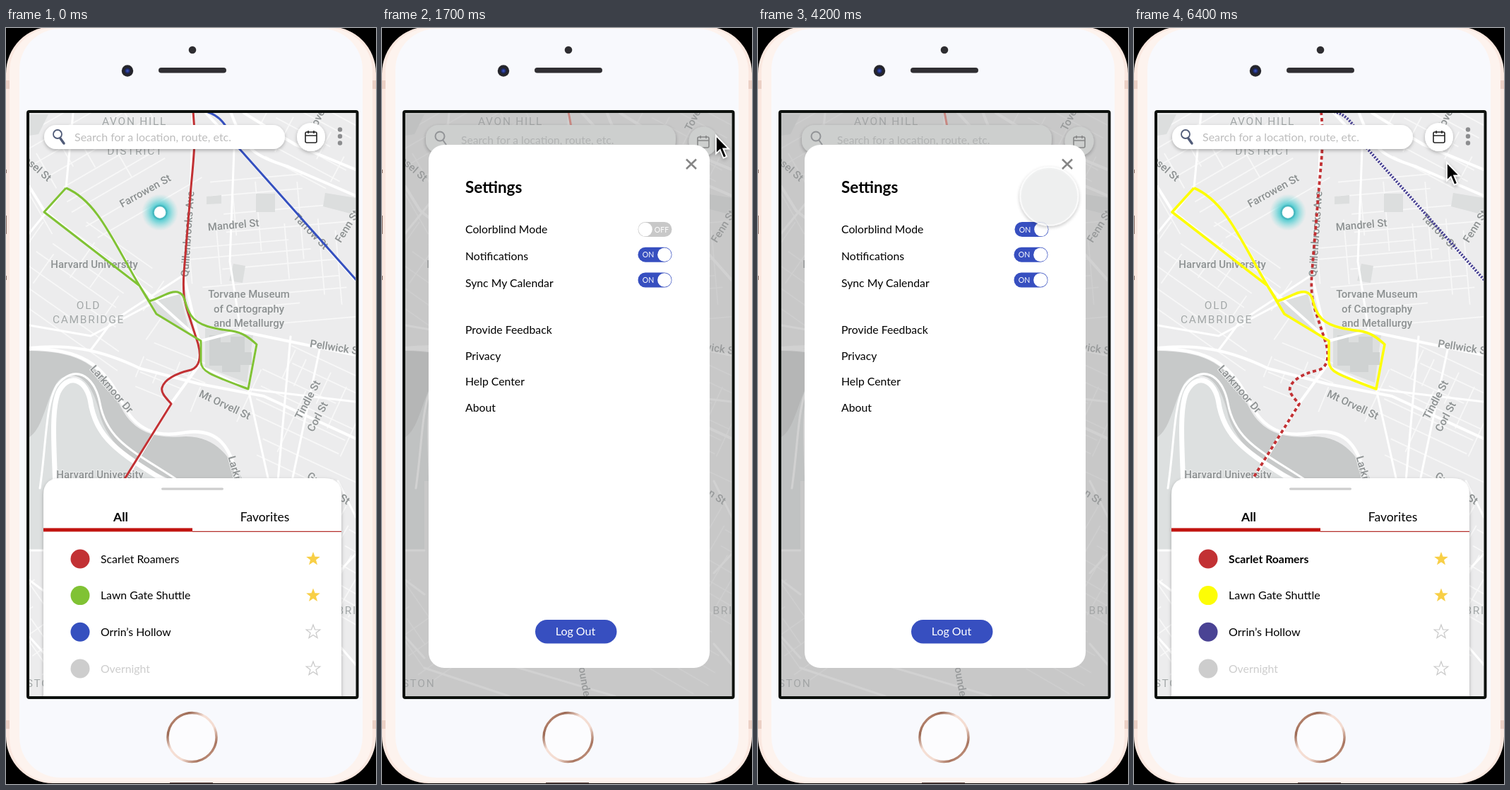
An HTML page that plays this animation: 524 by 1068 pixels, repeating every 6.5 s.

```html
<!DOCTYPE html>
<html lang="en">
<head>
<meta charset="utf-8">
<title>Shuttle map settings</title>
<style>
html, body { margin: 0; width: 100%; height: 100%; overflow: hidden; background: #000; }
svg { display: block; width: 524px; height: 1068px; }
text { font: 15.8px Lato, sans-serif; }
.mid { text-anchor: middle; }
.bold { font-weight: 700; }
#roads path { fill: none; stroke: #fff; stroke-linecap: round; stroke-linejoin: round; }
#labels text { font: 500 15px Roboto, sans-serif; fill: #8d9192; paint-order: stroke; stroke: #eeefef; stroke-width: 2px; }
#labels .area { font-weight: 400; font-size: 15.5px; letter-spacing: 1.7px; fill: #a3a7a8; }
.route { fill: none; stroke-linejoin: round; stroke-width: 3; }
.home, .before, .after, .set, .off, .on, #arrow, #touch { animation: 6.5s step-end infinite; }
.home { animation-name: home; }
.before { animation-name: before; }
.after { animation-name: after; }
.set { animation-name: set; }
.off { animation-name: off; }
.on { animation-name: on; }
#arrow { animation-name: arrow; }
#touch { animation-name: touch; }
@keyframes home { 0%, 80% { opacity: 1 } 26.154% { opacity: 0 } }
@keyframes before { 0% { opacity: 1 } 26.154%, 100% { opacity: 0 } }
@keyframes after { 0% { opacity: 0 } 80%, 100% { opacity: 1 } }
@keyframes set { 0%, 80% { opacity: 0 } 26.154% { opacity: 1 } }
@keyframes off { 0% { opacity: 1 } 55.385%, 100% { opacity: 0 } }
@keyframes on { 0% { opacity: 0 } 55.385%, 100% { opacity: 1 } }
@keyframes arrow {
  0% { transform: translate(534px, 300px); opacity: 1 }
  12.308% { transform: translate(534px, 300px); animation-timing-function: ease-out }
  20% { transform: translate(473px, 152px); opacity: 1 }
  33.846% { transform: translate(473px, 152px); opacity: 0 }
  80%, 100% { transform: translate(443px, 190px); opacity: 1 }
}
@keyframes touch {
  0% { transform: translate(473px, 152px); opacity: 0 }
  33.846% { transform: translate(473px, 152px); opacity: 1; animation-timing-function: ease-in-out }
  43.077% { transform: translate(383px, 285px); opacity: 1 }
  60% { transform: translate(383px, 285px); opacity: 1; animation-timing-function: ease-in-out }
  69.231% { transform: translate(441.5px, 191px); opacity: 1 }
  80%, 100% { transform: translate(441.5px, 191px); opacity: 0 }
}
</style>
</head>
<body>
<svg viewBox="0 0 524 1068">
<defs>
  <clipPath id="screen"><rect x="33" y="120" width="462" height="824"/></clipPath>
  <filter id="shade" x="-30%" y="-30%" width="160%" height="170%">
    <feDropShadow dx="0" dy="2" stdDeviation="2.5" flood-opacity=".28"/>
  </filter>
  <radialGradient id="glow">
    <stop offset=".3" stop-color="#35c3ca"/>
    <stop offset=".55" stop-color="#5fd0d4" stop-opacity=".75"/>
    <stop offset="1" stop-color="#8fdfe0" stop-opacity="0"/>
  </radialGradient>
  <radialGradient id="lens">
    <stop offset=".1" stop-color="#3a50b8"/>
    <stop offset=".5" stop-color="#1c2762"/>
    <stop offset=".75" stop-color="#24242a"/>
  </radialGradient>
  <linearGradient id="rose" x1="0" y1="0" x2="1" y2="1">
    <stop offset="0" stop-color="#d9a68f"/>
    <stop offset=".22" stop-color="#9c6a55"/>
    <stop offset=".4" stop-color="#f6e0d6"/>
    <stop offset=".62" stop-color="#f3dbd0"/>
    <stop offset=".8" stop-color="#a87560"/>
    <stop offset="1" stop-color="#e3b9a6"/>
  </linearGradient>
  <path id="red" d="M265 118C269 160 266 180 262 225L252 345C250 375 253 388 258 403L272 446C277 465 274 479 262 483C240 488 224 497 221 508C219 515 226 522 234 531L168 637"/>
  <path id="loop" d="M85 226L54 260L189 364L213 404L276 442V472C277 486 290 490 343 510L355 447C345 438 335 430 320 428C295 425 272 421 262 406C251 390 256 376 243 373C232 371 220 381 203 386L189 364C152 302 130 245 85 226"/>
  <path id="blue" d="M283 118C302 123 310 133 330 170L496 356"/>
  <g id="calendar" fill="none" stroke-width="1.6">
    <rect x="-8" y="-7" width="16" height="15" rx="2"/>
    <path d="M-8-2H8M-4-9V-5M4-9V-5"/>
  </g>
  <path id="star" d="M0-10L2.5-3.2L9.8-3L4 1.5L6 8.5L0 4.4L-6 8.5L-4 1.5L-9.8-3L-2.5-3.2Z"/>
</defs>

<!-- phone body -->
<rect x="0" y="-2" width="524" height="1069" rx="66" fill="#fbe8e0"/>
<path d="M0 74h7v12h-7zM517 74h7v12h-7zM0 978h7v12h-7zM517 978h7v12h-7z" fill="#ecd0c5"/>
<path d="M0 200v5M0 265v26M0 350v6" stroke="#8b7068" stroke-width="2"/>
<rect x="5" y="0" width="514" height="1065" rx="62" fill="#fdf3ee"/>
<rect x="19" y="1" width="486" height="1058" rx="58" fill="#f8f9fd"/>
<path d="M232 1067H293" stroke="#3b302d" stroke-width="2"/>
<circle cx="264" cy="31" r="5.3" fill="#2e2d31"/>
<rect x="216" y="56" width="96" height="7.6" rx="3.8" fill="#302f33"/>
<circle cx="172" cy="60.5" r="8.2" fill="#26262c"/>
<circle cx="172" cy="60.5" r="6.2" fill="url(#lens)"/>
<circle cx="263.500" cy="1002" r="34.5" fill="#fcfcfe" stroke="url(#rose)" stroke-width="3.4"/>

<g clip-path="url(#screen)">
  <rect x="30" y="116" width="470" height="832" fill="#ececed"/>
  <g id="streets" fill="none" stroke="#f8f8f8" stroke-width="1.7"></g>
  <g fill="#dcdede">
    <path d="M452 233L495 240V264L449 252ZM284 238L305 236V248L284 249ZM354 234H381V260H354Z"/>
    <path d="M322 333L339 336L335 360L316 357ZM206 388L246 375L260 430L215 405ZM33 122H60L46 150L33 152Z"/>
    <path d="M282 424L350 434L341 501L282 479Z"/>
    <path d="M33 520L73 490L125 500L160 600L218 640H33ZM33 630H60V737H33Z" fill="#dde0e0"/>
  </g>
  <path d="M288 434h16v10h14v-8h20v22h10v18h-16v10h-26v-9h-18z" fill="#cfd2d2"/>
  <path d="M30 456C105 456 135 477 160 530C180 575 215 580 255 577C300 578 315 605 340 645H250C200 625 150 600 134 550C124 505 108 485 82 493C60 500 56 565 33 578Z" fill="#c7c9c9"/>
  <g id="roads">
    <path stroke-width="4" d="M265 118L262 225L252 350L275 450L272 478L234 530L168 640"/>
    <path stroke-width="4" d="M33 224L54 258L190 365L276 442L330 428L495 462M33 452C85 447 130 452 190 481L275 503L365 520L495 580"/>
    <path stroke-width="4.500" d="M30 453C105 452 138 475 164 528C183 570 215 578 250 572C300 563 320 590 331 650"/>
    <path stroke-width="7" d="M70 650C68 590 64 540 74 515C87 488 112 494 119 525C127 580 160 600 225 640"/>
    <path stroke-width="3" d="M48 650C57 590 56 530 72 505C95 475 125 488 133 530C143 585 185 600 245 640"/>
    <path stroke-width="4" d="M318 118C338 172 350 180 400 196L495 237M337 120L410 165L495 200M283 120L330 170L495 356"/>
    <path stroke-width="3" d="M323 172L317 330L332 425M95 120L85 226L33 290M85 226C130 245 155 305 203 386L247 374"/>
    <path stroke-width="3" d="M355 447L343 510L372 640M403 436L385 640M445 450L405 640M276 478L343 510L495 528M33 420L120 435L205 390M120 455L150 415L250 350"/>
    <path stroke-width="3" d="M470 640L500 700M470 770L500 738M470 870L500 905M33 738H60M33 860L60 890M33 780L60 800M60 904L180 944M180 900L330 944"/>
  </g>
  <g id="labels"></g>

  <g class="before">
    <use href="#blue" class="route" stroke="#3550bf"/>
    <use href="#red" class="route" stroke="#c23134"/>
    <use href="#loop" class="route" stroke="#80c234"/>
  </g>
  <g class="after">
    <use href="#blue" class="route" stroke="#4a4394" style="stroke-width:4;stroke-dasharray:2.4 1.8"/>
    <use href="#red" class="route" stroke="#c23134" style="stroke-width:3.8;stroke-dasharray:5 4"/>
    <use href="#loop" class="route" stroke="#fdfd05" style="stroke-width:3.6"/>
  </g>

  <g class="home">
    <circle cx="218" cy="260.500" r="26" fill="url(#glow)"/>
    <circle cx="218" cy="260.500" r="9.500" fill="#fff" stroke="#49b9c0" stroke-width="2.400"/>
    <rect x="54" y="137" width="341" height="34" rx="17" fill="#fff" filter="url(#shade)"/>
    <g fill="none" stroke="#505b78">
      <circle cx="73" cy="150" r="6" stroke-width="1.800"/>
      <path d="M77 156L82 163" stroke-width="3.500" stroke-linecap="round"/>
    </g>
    <text x="97" y="160" style="font-size:16px" fill="#bdbdbd">Search for a location, route, etc.</text>
    <circle cx="432" cy="154" r="20" fill="#fff" filter="url(#shade)"/>
    <use href="#calendar" x="432" y="154" stroke="#222"/>
    <g fill="#8c8d8f"><circle cx="473" cy="143.500" r="3.200"/><circle cx="473" cy="153" r="3.200"/><circle cx="473" cy="162.500" r="3.200"/></g>
    <path d="M53 960V660Q53 636 77 636H451Q475 636 475 660V960Z" fill="#fff" filter="url(#shade)"/>
    <rect x="220" y="649.500" width="88" height="3.200" rx="1.600" fill="#cecece"/>
    <text x="162.500" y="697" class="mid bold" style="font-size:17.5px">All</text>
    <text x="366.500" y="697" class="mid" style="font-size:17.5px">Favorites</text>
    <path d="M53 706.500H264V711.500H53Z" fill="#c1130f"/>
    <path d="M264 711.300H475" stroke="#b5302c" stroke-width="1.300"/>
    <use href="#star" x="435" y="750" fill="#f8cf46"/>
    <use href="#star" x="435" y="801.500" fill="#f8cf46"/>
    <g fill="none" stroke="#c9c9c9" stroke-width="1.200">
      <use href="#star" x="435" y="853"/><use href="#star" x="435" y="905"/>
    </g>
    <circle cx="105" cy="905" r="13.500" fill="#cdcdcd"/>
    <text x="134" y="910.500" fill="#cdcdcd">Overnight</text>
  </g>
  <g class="before" data-dots="#c23134 #80c234 #3550bf"></g>
  <g class="after" data-dots="#c23134 #fdfd05 #4a4394"></g>

  <g class="set">
    <rect x="30" y="116" width="470" height="832" fill="#a4a4a4" opacity=".5"/>
    <path d="M264 118L268 140" stroke="#c98983" stroke-width="3"/>
    <rect x="62" y="137" width="354" height="40" rx="18" fill="#cdcfce" filter="url(#shade)"/>
    <g fill="none" stroke="#929497" stroke-width="2"><circle cx="82" cy="153" r="6.500"/><path d="M86 158L91 165"/></g>
    <text x="112" y="164" style="font-size:15.6px" fill="#b1b3b3">Search for a location, route, etc.</text>
    <circle cx="455" cy="160" r="20.500" fill="#cdcfce" filter="url(#shade)"/>
    <use href="#calendar" x="455" y="161" stroke="#858686"/>
    <rect x="66" y="165" width="398" height="739" rx="22" fill="#fff"/>
    <path d="M431 185.500L445 199M445 185.500L431 199" stroke="#858585" stroke-width="2.500"/>
    <text x="118" y="233" class="bold" style="font-size:22.5px">Settings</text>
    <g id="options"></g>
    <g class="off">
      <rect x="362.500" y="274" width="48" height="21" rx="10.500" fill="#c8c8c8"/>
      <circle cx="373" cy="284.500" r="9.800" fill="#fff"/>
      <text x="396" y="288.500" class="mid" style="font-size:10.5px" fill="#fff">OFF</text>
    </g>
    <g class="on" data-toggle="363.5 274"></g>
    <g data-toggle="362.5 309.700"></g>
    <g data-toggle="362.5 345.500"></g>
    <rect x="217" y="836" width="115.500" height="33.500" rx="16.700" fill="#374fc0"/>
    <text x="274" y="858" class="mid" style="font-size:16px" fill="#fff">Log Out</text>
  </g>
</g>
<rect x="31" y="118" width="466.500" height="828" rx="2" fill="none" stroke="#0d110e" stroke-width="4"/>

<g id="touch">
  <circle r="41" fill="#f1f2f2" fill-opacity=".8" stroke="#fff" stroke-width="1.600" filter="url(#shade)"/>
</g>
<g id="arrow">
  <path d="M0 0V25.500L5.800 20L10.600 31.500L15 29.600L10.200 18.500H18Z" fill="#000" stroke="#fff" stroke-width="1.800" filter="url(#shade)"/>
</g>
</svg>
<script>
const $ = s => document.querySelector(s);
const all = (s, fn) => document.querySelectorAll(s).forEach(fn);

let seed = 7;
const rand = () => (seed = seed * 16807 % 2147483647) / 2147483647;

// A turned grid of side streets with random gaps
function district(x, y, w, h, turn, dx, dy) {
  let d = '';
  for (let v = -h / 2; v <= h / 2; v += dy * (.7 + rand() * .6)) {
    const start = -w / 2 + rand() * w * .25;
    d += `M${start.toFixed(1)} ${v.toFixed(1)}h${(w * (.5 + rand() * .35)).toFixed(1)}`;
  }
  for (let u = -w / 2; u <= w / 2; u += dx * (.7 + rand() * .6)) {
    const start = -h / 2 + rand() * h * .45;
    d += `M${u.toFixed(1)} ${start.toFixed(1)}v${(h * (.2 + rand() * .35)).toFixed(1)}`;
  }
  return `<path transform="translate(${x} ${y}) rotate(${turn})" d="${d}"/>`;
}

$('#streets').innerHTML = [
  district(140, 190, 230, 180, -30, 30, 22),
  district(120, 370, 220, 150, 35, 34, 24),
  district(380, 315, 240, 210, -5, 32, 21),
  district(430, 165, 150, 110, 28, 28, 20),
  district(430, 560, 190, 180, 25, 26, 22),
  district(240, 500, 110, 80, 22, 26, 20),
  district(485, 790, 120, 320, 30, 20, 20),
  district(45, 850, 90, 200, -35, 24, 26)
].join('');

const label = (x, y, turn, name, type = '') =>
  `<text class="mid ${type}" transform="translate(${x} ${y}) rotate(${turn})" dy="5.300">${name}</text>`;

$('#labels').innerHTML = [
  label(182, 132, 0, 'AVON HILL', 'area'),
  label(183, 174, 0, 'DISTRICT', 'area'),
  label(117, 392, 0, 'OLD', 'area'),
  label(117, 412, 0, 'CAMBRIDGE', 'area'),
  label(500, 823, 0, 'BRIDGE', 'area'),
  label(52, 926, 0, 'STON', 'area'),
  label(125, 334, 0, 'Harvard University'),
  label(133, 631, 0, 'Harvard University'),
  label(344, 376, 0, 'Torvane Museum'),
  label(344, 396.500, 0, 'of Cartography'),
  label(344, 417, 0, 'and Metallurgy'),
  label(197, 230, -29, 'Farrowen St'),
  label(322, 278, -5, 'Mandrel St'),
  label(257, 291, -86, 'Quillenbrooks Ave'),
  label(432, 287, 46, 'Tarrow St'),
  label(483, 280, -58, 'Fenn St'),
  label(150, 510, 49, 'Larkmoor Dr'),
  label(310, 532, 25, 'Mt Orvell St'),
  label(427, 525, -62, 'Tindle St'),
  label(441, 549, -62, 'Corl St'),
  label(331, 645, 74, 'Larkmoor Dr'),
  label(457, 650, 34, 'Greslen St'),
  label(467, 451, 9, 'Pellwick St'),
  label(41, 195, 41, 'Hosel St'),
  label(444, 122, -62, 'Tove St'),
  label(287, 922, 80, 'Founder')
].join('');

const routes = ['Scarlet Roamers', 'Lawn Gate Shuttle', 'Orrin’s Hollow'];
all('[data-dots]', g => {
  const late = g.classList.contains('after');
  g.innerHTML = g.dataset.dots.split(' ').map((color, i) => {
    const y = 750 + i * 51.6;
    return `<circle cx="105" cy="${y}" r="13.500" fill="${color}"/>
      <text x="134" y="${y + 5.5}" class="${late && !i ? 'bold' : ''}"
        style="font-size:${late && i ? 16.1 : 15.8}px">${routes[i]}</text>`;
  }).join('');
});

all('[data-toggle]', g => {
  const [x, y] = g.dataset.toggle.split(' ').map(Number);
  g.innerHTML = `<rect x="${x}" y="${y}" width="48" height="21" rx="10.500" fill="#374fc0"/>
    <circle cx="${x + 37.5}" cy="${y + 10.5}" r="9.800" fill="#fff"/>
    <text x="${x + 14.5}" y="${y + 14.5}" class="mid" style="font-size:10.5px" fill="#fff">ON</text>`;
});

const options = [
  ['Colorblind Mode', 290], ['Notifications', 328], ['Sync My Calendar', 366],
  ['Provide Feedback', 431.5], ['Privacy', 468.5], ['Help Center', 504.5], ['About', 541.5]
];
$('#options').innerHTML = options.map(([name, y]) => `<text x="118" y="${y}">${name}</text>`).join('');
</script>
</body>
</html>
```
